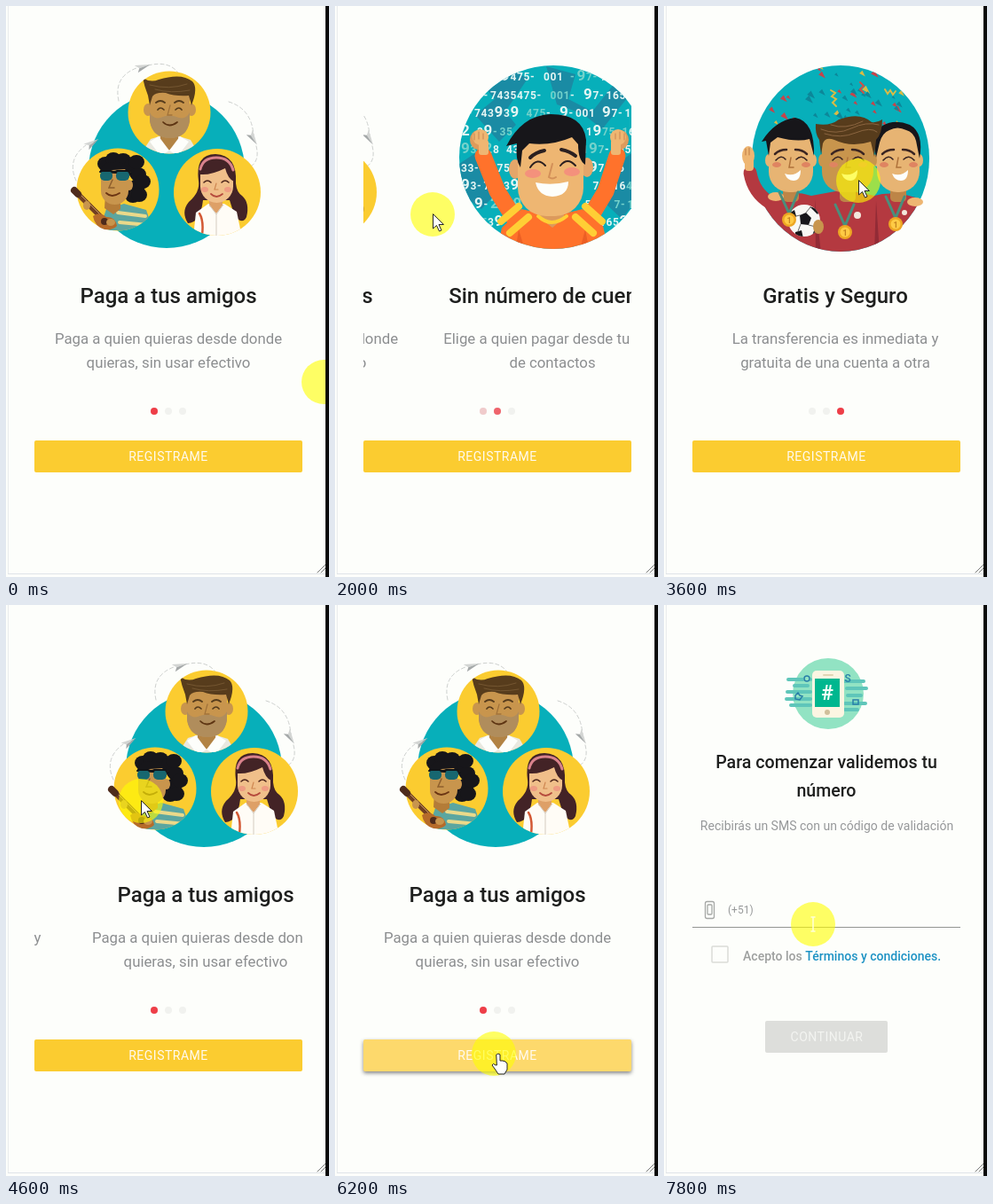
An HTML page with a canvas for the animation above (8000 ms loop, 364x644 px).

```html
<!DOCTYPE html>
<html lang="es">
<head>
<meta charset="utf-8">
<title>Bienvenida</title>
<style>
html, body { margin: 0; width: 100%; height: 100%; overflow: hidden; background: #fdfefb; }
canvas { display: block; width: 364px; height: 644px; }
</style>
</head>
<body>
<canvas id="stage" width="364" height="644"></canvas>
<script>
const g = document.getElementById('stage').getContext('2d');
const LOOP = 8000, STEP = 200, SLIDE = 302;
const PAPER = '#fdfefb', YELLOW = '#fbcc30', TEAL = '#07afba', INK = '#1e1f1e', GREY = '#8c8e90',
  TAN = '#c8954d', SKIN = '#eeb672', BROWN = '#573c1c', BLACK = '#17161a', ORANGE = '#ff722b', RED = '#b43940';

const clamp = v => Math.max(0, Math.min(1, v));

// Linear interpolation through [time, ...values] rows.
function track(keys, t) {
  let i = 0;
  while (i < keys.length - 2 && t >= keys[i + 1][0]) i++;
  const a = keys[i], b = keys[i + 1], p = clamp((t - a[0]) / (b[0] - a[0]));
  return a.slice(1).map((v, j) => v + (b[j + 1] - v) * p);
}

function fill(color, d) { g.fillStyle = color; g.fill(new Path2D(d)); }
function line(color, w, d) {
  g.strokeStyle = color; g.lineWidth = w; g.lineCap = 'round';
  g.stroke(new Path2D(d));
}
function oval(color, x, y, rx, ry = rx) {
  g.fillStyle = color; g.beginPath(); g.ellipse(x, y, rx, ry, 0, 0, 7); g.fill();
}
function box(color, x, y, w, h, r = 0) {
  g.fillStyle = color; g.beginPath(); g.roundRect(x, y, w, h, r); g.fill();
}
function clipOval(x, y, rx, ry, draw) {
  g.save(); g.beginPath(); g.ellipse(x, y, rx, ry, 0, 0, 7); g.clip(); draw(); g.restore();
}
function text(s, x, y, size, color, weight = 400, align = 'center', spacing = 0) {
  g.font = `${weight} ${size}px Roboto, sans-serif`;
  g.letterSpacing = spacing + 'px';
  g.textAlign = align; g.fillStyle = color;
  g.fillText(s, x, y);
}
function random(seed) {
  return () => (seed = (seed * 16807) % 2147483647) / 2147483647;
}

function plane(x, y, angle) {
  g.save(); g.translate(x, y); g.rotate(angle);
  fill('#d3d5d3', 'M9 0L-8-5L-4 0Z');
  fill('#a4a8a8', 'M9 0L-4 0L-7 4Z');
  g.restore();
}

function manTop() {
  fill('#e9e8e0', 'M150 170L163 150L176 146H192L208 151L219 170Z');
  fill('#b28344', 'M174 140H194V152L184 163L174 152Z');
  fill('#fdfefb', 'M172 147L184 163L174 169L162 153ZM196 147L184 163L194 169L206 153Z');
  oval(TAN, 160, 117, 5, 7); oval(TAN, 209, 117, 5, 7);
  box(TAN, 162, 86, 45, 63, [10, 10, 22, 22]);
  fill('#b08d5c', 'M162 120Q166 128 174 126Q184 121 195 126Q203 128 207 120V130Q204 149 185 149Q165 149 162 130Z');
  fill(BROWN, 'M162 112L160 101Q156 91 154 81Q163 87 172 83Q198 75 210 85Q217 92 209 112L206 101Q190 102 180 98Q169 97 165 102Z');
  line('#745631', 1, 'M162 89Q184 95 204 88M168 94Q186 99 207 95');
  line(BROWN, 2, 'M169 109Q174 105 179 109M190 109Q195 105 200 109');
  line(BROWN, 1.7, 'M171 117Q174 113 178 117M191 117Q195 113 198 117');
  line('#a2733a', 1.3, 'M185 112L182 123H187');
  line('#5d3412', 1.7, 'M177 131Q184 138 193 131');
}

function guitarist() {
  fill('#5ba6a0', 'M105 253L113 229L133 223L158 230L166 253Z');
  line('#ead98a', 4, 'M126 233L157 237M128 244L160 247');
  fill('#b47c38', 'M112 213H129V229L121 235L111 228Z');
  [[112, 178], [121, 173], [132, 174], [142, 180], [149, 190], [148, 203], [143, 214], [150, 213], [154, 198], [147, 176]]
    .forEach(([x, y]) => oval(BLACK, x, y, 9, 8));
  box(TAN, 107, 180, 31, 44, [8, 8, 16, 16]);
  oval(TAN, 139, 202, 4, 6);
  fill(BLACK, 'M106 186Q108 175 125 176Q139 175 142 195L134 184Z');
  line('#111418', 2, 'M106 187L141 189');
  box('#176770', 106, 186, 14, 11, 5); box('#176770', 124, 186, 15, 11, 5);
  line('#111418', 2, 'M107 186H118Q122 188 125 186H138');
  line('#8f5f2c', 1.5, 'M120 196L116 205H122');
  line('#6b3513', 1.8, 'M113 211Q119 217 128 211');
}

function woman() {
  fill('#432326', 'M217 197Q213 167 236 167Q261 168 259 200Q260 210 266 214Q275 222 271 238Q266 248 257 235L252 219H222Q219 245 205 245Q197 232 206 221Q219 210 217 197Z');
  fill('#fffcf6', 'M211 261L214 233L228 223H246L260 232L266 261Z');
  fill('#dea067', 'M229 211H244V225L237 234L229 225Z');
  line('#d4ccc0', 1, 'M229 224L237 235L245 224M237 235V259');
  box('#f0bf8a', 219, 176, 37, 46, [15, 15, 20, 20]);
  fill('#432326', 'M217 198Q215 172 236 172Q258 173 257 198Q250 195 247 183Q231 191 219 190Z');
  line('#d9828c', 3, 'M219 184Q222 171 237 171Q252 171 256 185');
  oval('#ef9c82', 224, 207, 4, 3); oval('#ef9c82', 250, 207, 4, 3);
  line('#50281d', 1.6, 'M223 199Q227 195 231 199M243 199Q247 195 251 199');
  line('#cf8852', 1.2, 'M237 200L235 207H239');
  line('#b64b3d', 1.8, 'M231 212Q237 218 244 212');
  line('#d35935', 2.5, 'M218 234Q223 242 221 258');
}

function friends() {
  g.setLineDash([4, 3]);
  line('#cdd0ce', 1, 'M127 107Q121 80 147 70M160 67Q185 61 195 77M79 197Q68 173 90 157M251 108Q277 116 279 146M282 158Q286 174 276 181');
  g.setLineDash([]);
  oval(TEAL, 181, 185, 88);
  oval(YELLOW, 184, 120, 46.5); oval(YELLOW, 126, 207, 46.5); oval(YELLOW, 238, 210, 49);
  clipOval(184, 120, 46.5, 46.5, manTop);
  clipOval(126, 207, 46.5, 46.5, guitarist);
  clipOval(238, 210, 49, 49, woman);
  line('#713e22', 6, 'M80 211L112 243');
  line('#c59a60', 1, 'M81 210L114 243');
  line('#4e2b1c', 8, 'M77 208L81 212');
  fill('#b66b2a', 'M98 237Q105 231 113 238Q123 237 125 248Q121 253 111 252Q100 249 98 237Z');
  oval('#4e2b1c', 111, 243, 4);
  oval(TAN, 118, 244, 5, 4); oval(TAN, 91, 225, 4, 5);
  plane(154, 69, -.35); plane(97, 155, -.6); plane(278, 149, 1);
}

const rows = [' 5-7439475- 001 -97-165', '39 -7435475- 001- 97-165283', '0-743939 475- 9-001 97-16 5',
  '2 39-35 475 - 001 1975-16528', '93-28 439 475- 1 197-165412', '33-2475- 39- 001-297-16 5283', '93-7-539 475- 001- 75-16412 8',
  '0 9-2439 28- 16- 5 9 7-16528', '3- 539 475- 001- 97-1652 83', '35- 7439 001- 97-165 412'];

function numberMan() {
  clipOval(186, 170.5, 106, 103.5, () => {
    box(TEAL, 75, 60, 220, 220);
    fill('#1a8ba4', 'M109 92L134 68L157 82L132 119L144 134L125 153L98 123L120 105ZM178 68L211 77L203 105L230 119L270 68L282 88L241 139L220 122L190 111ZM80 178L101 164L122 211L105 229L81 211ZM255 181L294 150V202L263 240L242 220Z');
    rows.forEach((s, i) => {
      let x = 82;
      [...s].forEach((c, n) => {
        const big = c === '9' || c === '2';
        text(c, x, 84 + i * 20.5, big ? 17 : 12, (n >> 2) + i & 3 ? '#e4f5f3' : '#74d2cb', 700, 'left');
        x += big ? 10.5 : 7.5;
      });
    });
    line(ORANGE, 19, 'M107 169L123 209L145 244M258 169L245 209L224 244');
    fill(ORANGE, 'M122 278L128 250L150 229L172 234H199L219 229L242 248L249 278Z');
    fill('#ec5f24', 'M147 252L155 278H143ZM222 252L215 278H227Z');
    line('#ffcf35', 8, 'M127 243L147 226M137 256L158 238M241 243L222 226M231 256L211 238');
    oval('#dd9b5c', 102, 151, 10, 11); oval(SKIN, 104, 148, 9, 9);
    oval('#dd9b5c', 261, 151, 10, 11); oval(SKIN, 259, 148, 9, 9);
    line('#c98450', 1, 'M97 144V151M102 142V150M107 144V150M256 144V150M261 142V150M266 144V151');
    box(SKIN, 102, 151, 11, 17, 3); box(SKIN, 251, 151, 11, 17, 3);
  });
  fill('#dc9a5c', 'M171 225H198V239L185 250L171 239Z');
  line('#ffcf35', 4, 'M169 237Q184 251 201 237');
  oval('#e4a66a', 143, 184, 7, 11); oval('#e4a66a', 224, 182, 7, 11);
  box(SKIN, 146, 137, 74, 100, [28, 28, 32, 32]);
  fill(BLACK, 'M133 158Q151 123 183 122Q220 122 223 151L222 179Q214 174 214 156L207 148Q184 158 159 155L151 163L149 182Q143 174 145 155Q140 156 133 158Z');
  line('#2b2020', 4, 'M160 171Q166 165 176 163M195 162Q205 164 211 169');
  line('#2b2020', 2, 'M160 182Q168 170 177 180M194 180Q202 170 211 180');
  oval('#f4917c', 163, 189, 9, 5); oval('#f4917c', 207, 187, 9, 5);
  line('#d39058', 2, 'M185 178L181 193Q185 196 189 193');
  fill('#fdfefb', 'M166 199Q184 203 203 198Q203 214 185 215Q169 214 166 199Z');
}

function medal(x, y) {
  line('#4a8f7c', 3, `M${x - 11} ${y - 31}L${x} ${y - 7}L${x + 10} ${y - 31}`);
  oval('#eda622', x, y, 8); oval('#ffcb45', x, y, 5.5);
  text('1', x, y + 3.5, 9, '#c48320', 700);
}

function player(x, y, w, skin) {
  box('#bd8547', x - 9, y + 28, 18, 24, 5);
  oval(skin, x - w, y + 5, 4, 7); oval(skin, x + w, y + 5, 4, 7);
  box(skin, x - w, y - 34, w * 2, 75, [20, 20, 23, 23]);
  line('#3a2522', 2.5, `M${x - 18} ${y - 2}Q${x - 13} ${y - 7} ${x - 5} ${y - 7}M${x + 5} ${y - 7}Q${x + 13} ${y - 7} ${x + 18} ${y - 2}`);
  line('#3a2522', 1.6, `M${x - 17} ${y + 5}Q${x - 11} ${y - 2} ${x - 6} ${y + 4}M${x + 6} ${y + 4}Q${x + 12} ${y - 2} ${x + 18} ${y + 5}`);
  oval('#df8461', x - 16, y + 10, 5, 3); oval('#df8461', x + 17, y + 10, 5, 3);
  line('#b0733b', 1.5, `M${x} ${y + 2}L${x - 2} ${y + 13}H${x + 3}`);
  fill('#fdfefb', `M${x - 7} ${y + 20}Q${x + 3} ${y + 24} ${x + 11} ${y + 16}Q${x + 11} ${y + 28} ${x + 3} ${y + 28}Q${x - 4} ${y + 28} ${x - 7} ${y + 20}Z`);
}

function team() {
  oval(TEAL, 199, 172, 100, 105);
  clipOval(199, 172, 100, 105, () => {
    const rnd = random(23);
    for (let i = 0; i < 70; i++) {
      const x = 102 + rnd() * 195, y = 68 + rnd() * 80, s = 2 + rnd() * 2.5;
      fill(['#c7434a', '#0c8799', '#c7434a', '#0c8799', '#dcba44'][i % 5], `M${x} ${y}l${s} ${-s}l${s} ${s * 2}Z`);
    }
    line('#d9bb45', 2, 'M188 95l5 3l-4 4l5 3l-4 4l4 4M249 94l3 5l3-4l3 5l3-4');
    line('#d15048', 2, 'M221 86l4 4l-4 4l4 4');
  });
  line(RED, 15, 'M97 188Q101 211 120 222');
  oval(SKIN, 95, 169, 7, 11); box(SKIN, 91, 171, 10, 15, 4);
  line('#bd7a44', 1, 'M92 161V168M96 160V168');
  clipOval(199, 172, 100, 105, () => {
    fill(RED, 'M94 209L126 215Q144 207 166 214L204 207L237 214Q262 207 295 220V280H94Z');
    fill('#922b36', 'M170 218L177 278H171ZM239 219L237 278H243Z');
    player(143, 169, 25, '#e7b473');
    player(264, 169, 24, '#e7b473');
    player(207, 169, 29, TAN);
  });
  fill(BLACK, 'M110 153Q125 129 148 126Q170 130 169 169L164 150Q150 154 128 148L120 154L118 169L115 152Z');
  fill(BLACK, 'M239 171Q234 145 246 135Q260 127 277 134Q293 143 288 172L284 152Q281 142 273 140Q263 135 254 140Q246 143 243 154Z');
  fill(BROWN, 'M177 168L175 151Q170 144 171 133Q187 136 197 128Q221 119 234 131Q240 132 246 128Q246 144 239 151L237 170L233 153Q211 160 192 151Q182 147 179 155Z');
  line('#8b6540', 1, 'M177 139Q194 146 211 138T242 134M181 144Q199 150 216 143T240 142M188 134Q204 140 224 130');
  oval('#f8f8f4', 158, 242, 18);
  clipOval(158, 242, 18, 18, () => {
    fill(BLACK, 'M153 236L160 233L166 239L163 247L154 246ZM139 235L147 230L149 237L144 244ZM164 226L176 230L173 235ZM171 248L178 244L174 257L167 259ZM148 255L155 253L157 262H148Z');
    line('#646464', 1, 'M149 237L153 236M160 233L165 227M163 247L171 249M154 246L151 254');
  });
  oval(TAN, 174, 249, 6, 8); oval(SKIN, 126, 215, 9, 5); oval(SKIN, 283, 221, 9, 5);
  medal(141, 241); medal(204, 255); medal(261, 246);
  oval('#f3e8dc', 218, 236, 4); oval('#f3e8dc', 271, 233, 3);
}

const slides = [
  { title: 'Paga a tus amigos', body: ['Paga a quien quieras desde donde', 'quieras, sin usar efectivo'], art: friends, dx: 0 },
  { title: 'Sin número de cuenta', body: ['Elige a quien pagar desde tu lista', 'de contactos'], art: numberMan, dx: -2 },
  { title: 'Gratis y Seguro', body: ['La transferencia es inmediata y', 'gratuita de una cuenta a otra'], art: team, dx: -10 }
];

const scroll = [[0, 0], [1400, 0], [1600, 55], [1800, 145], [2000, 240], [2200, 282], [2400, 296], [2800, 300.5],
  [3200, 312], [3400, 500], [3600, 594], [3800, 602], [4000, 604], [4200, 650], [4400, 765], [4600, 864], [4800, 897], [5000, 904], [5200, 906]];

const pointer = [[0, 358, 424], [400, 325, 330], [800, 294, 265], [1400, 280, 236], [1600, 224, 235], [1800, 155, 235], [2000, 110, 235],
  [2400, 103, 222], [2800, 112, 211], [3000, 230, 204], [3200, 300, 200], [3400, 248, 198], [3600, 219, 197], [3800, 222, 199],
  [4200, 284, 214], [4400, 220, 218], [4600, 152, 221], [5000, 146, 252], [5400, 158, 360], [5800, 176, 480], [6000, 179, 506],
  [7000, 179, 506], [7200, 180, 500], [7400, 178, 470], [7600, 172, 405], [7800, 168, 360]];

function carousel(t) {
  const pos = track(scroll, t)[0];
  g.save();
  g.beginPath(); g.rect(32, 0, 302, 470); g.clip();
  const first = Math.floor(pos / SLIDE);
  for (let n = first; n <= first + 1; n++) {
    const s = slides[n % 3];
    g.save();
    g.translate(Math.round(n * SLIDE - pos), 0);
    text(s.title, 183, 335, 24, INK, 500);
    s.body.forEach((row, i) => text(row, 183, 381 + i * 27, 16.8, GREY));
    g.translate(s.dx, 0);
    s.art();
    g.restore();
  }
  g.restore();

  const mix = clamp((pos / SLIDE - first - .55) / .31);
  for (let i = 0; i < 3; i++) {
    const x = 167 + i * 16, on = i === first % 3 ? 1 - mix : i === (first + 1) % 3 ? mix : 0;
    oval('#f1f2ef', x, 457, 4);
    oval(`rgba(238,62,72,${on})`, x, 457, 4);
  }

  const hover = t >= 5800;
  g.save();
  if (hover) { g.shadowColor = 'rgba(50,50,50,.6)'; g.shadowBlur = 4; g.shadowOffsetY = 2; }
  box(hover ? '#fdd96c' : YELLOW, 32, 490, 302, 36, 2);
  g.restore();
  text('REGISTRAME', 183, 513, 14, '#fffaf0', 400, 'center', .5);
}

function verification() {
  oval('#92e3c3', 185, 100, 40);
  line('#5fc6ba', 4, 'M140 84H165M147 91H162M139 98H165M138 106H165M143 113H165M203 86H225M206 94H228M207 102H222M204 111H227M204 118H218');
  oval('#92e3c3', 161, 83, 4);
  line('#287fa8', 1.5, 'M158 83A3 3 0 1 0 164 83A3 3 0 1 0 158 83M151 99L153 102L156 103L153 107L148 106L148 102ZM213 107H219V112H213Z');
  text('S', 207, 87, 12, '#287fa8', 500);
  box('#fcf5e2', 167, 74, 36, 53, 5);
  box('#00b78f', 170, 83, 28, 32);
  line('#e0d5b4', 2, 'M180 79H190');
  oval('#d0bf9a', 184, 121, 3);
  text('#', 184, 107, 23, '#f8fffa', 700);

  text('Para comenzar validemos tu', 183, 184, 19.6, INK, 500);
  text('número', 183, 216, 19.6, INK, 500);
  text('Recibirás un SMS con un código de validación', 183.5, 254, 14, '#96989a');

  g.strokeStyle = '#a6a8a6'; g.lineWidth = 1.3;
  g.beginPath(); g.roundRect(46.5, 334.5, 10, 19, 2); g.roundRect(49, 338, 5, 11, 1); g.stroke();
  text('(+51)', 72, 348, 12, '#97999a', 400, 'left');
  box('#939593', 32, 363, 302, 1);
  g.strokeStyle = '#dadbd8'; g.lineWidth = 1.5;
  g.beginPath(); g.roundRect(54, 385, 18, 18, 1); g.stroke();
  text('Acepto los ', 89, 401, 14, '#9d9f9e', 500, 'left');
  text('Términos y condiciones.', 159.3, 401, 14, '#1d92c4', 500, 'left');
  box('#dddedb', 114, 469, 138, 36, 2);
  text('CONTINUAR', 183.5, 492, 14, '#f3f4f1', 400, 'center', .5);
}

function cursor(t) {
  const [x, y] = track(pointer, t);
  g.save();
  g.beginPath(); g.rect(0, 0, 360, 644); g.clip();
  oval('rgba(255,255,0,.6)', x, y, 25);
  g.restore();
  if (x > 355) return;
  g.save();
  g.translate(x, y);
  let d = 'M.5 0V16L4.5 12.5L7.5 19L10 18L7 11.5H12Z';
  if (t >= 7600) {
    line('#ffffd8', 1.5, 'M0-7V7M-2-8H2M-2 8H2');
  } else {
    if (t >= 5800 && t < 7400) d = 'M3 1Q5-1 7 1V8L10 8L13 9L15 11V18L12 23H5L1 17L-2 13Q-1 10 2 13H3Z';
    fill('#fffffb', d);
    line('#252525', 1, d);
  }
  g.restore();
}

function draw(t) {
  box(PAPER, 0, 0, 364, 644);
  g.globalAlpha = clamp((7100 - t) / 400);
  if (g.globalAlpha > 0) carousel(t);
  g.globalAlpha = clamp((t - 6900) / 600);
  if (g.globalAlpha > 0) verification();
  g.globalAlpha = 1;
  box('#e9ecec', 2, 0, 1, 640);
  box('#dfe3e8', 2, 640, 358, 1);
  line('#777977', 1, 'M351 639L360 630M355 639L360 634');
  cursor(t);
  box('#080808', 360, 0, 4, 644);
}

function frame(now) {
  draw(Math.floor((now % LOOP) / STEP) * STEP);
  requestAnimationFrame(frame);
}
draw(0);
requestAnimationFrame(frame);
</script>
</body>
</html>
```
